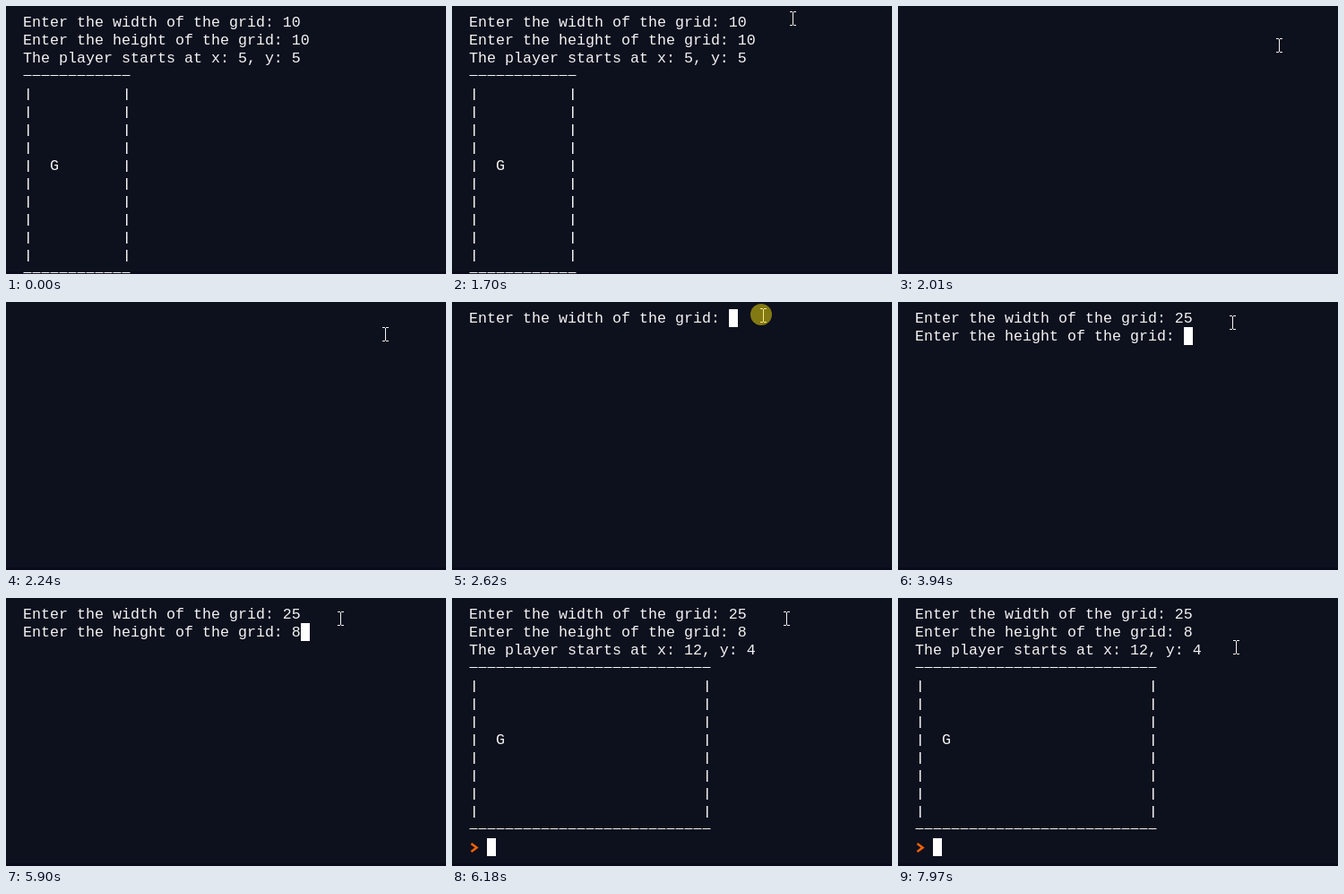
An HTML page with a canvas that plays this animation: 491 by 299 pixels, repeating every 8000 ms.

```html
<!DOCTYPE html>
<html lang="en">
<head>
<meta charset="utf-8">
<title>Grid prompt</title>
<style>
html, body { margin: 0; height: 100%; overflow: hidden; background: #0d101d; }
canvas { display: block; }
</style>
</head>
<body>
<canvas id="stage" width="491" height="299"></canvas>
<script>
const ctx = document.getElementById('stage').getContext('2d');
const LOOP = 8000, CELL = 10, LINE = 20, LEFT = 19, TOP = 8;
const INK = '#f4f4f4';
const WIDTH_PROMPT = 'Enter the width of the grid: ';
const HEIGHT_PROMPT = 'Enter the height of the grid: ';

// Pointer steps: time, left, top (no position: hidden)
const pointer = [
  [0], [70, 120, 209], [140],
  [1700, 377, 6], [1780, 388, 13], [1850, 401, 22], [1930, 413, 30],
  [2010, 422, 36], [2080, 430, 38], [2160, 433, 36], [2240, 420, 28],
  [2310, 391, 18], [2390, 361, 10], [2470, 344, 7],
  [2700, 351, 9], [2770, 363, 12], [2850, 370, 15],
  [7890, 379, 31], [7970, 374, 47]
];

const colX = col => LEFT + col * CELL;
const rowY = row => TOP + row * LINE;

function rect(x, y, w, h, color = INK) {
  ctx.fillStyle = color;
  ctx.fillRect(x, y, w, h);
}

function text(str, row, col = 0) {
  ctx.fillStyle = INK;
  ctx.fillText(str, colX(col), rowY(row) + 15);
}

function block(row, col) {
  rect(colX(col), rowY(row), CELL, LINE, '#fff');
}

function grid(width, height, goalX, goalY) {
  for (const row of [3, height + 4]) {
    for (let col = 0; col < width + 2; col++) rect(colX(col) + 0.5, rowY(row) + 9, 9, 1);
  }
  for (let row = 4; row < height + 4; row++) {
    for (const col of [0, width + 1]) rect(colX(col) + 5, rowY(row) + 4, 1.5, 13);
  }
  text('G', goalY + 4, goalX + 1);
}

function result(width, height, goalX, goalY) {
  text(WIDTH_PROMPT + width, 0);
  text(HEIGHT_PROMPT + height, 1);
  text(`The player starts at x: ${width >> 1}, y: ${height >> 1}`, 2);
  grid(width, height, goalX, goalY);
}

function input(prompt, typed, row) {
  text(prompt + typed, row);
  block(row, prompt.length + typed.length);
}

function shellPrompt(row) {
  const y = rowY(row);
  ctx.strokeStyle = '#f26207';
  ctx.lineWidth = 2.6;
  ctx.beginPath();
  ctx.moveTo(21.5, y + 6);
  ctx.lineTo(27.5, y + 10.5);
  ctx.lineTo(21.5, y + 15);
  ctx.stroke();
  block(row, 2);
}

function terminal(t) {
  if (t < 1850) result(10, 10, 2, 4);
  else if (t < 2310) return;
  else if (t < 3940) input(WIDTH_PROMPT, t < 3480 ? '' : t < 3710 ? '2' : '25', 0);
  else if (t < 6180) {
    text(WIDTH_PROMPT + '25', 0);
    input(HEIGHT_PROMPT, t < 5900 ? '' : '8', 1);
  } else {
    result(25, 8, 2, 3);
    shellPrompt(13);
  }
}

function drawPointer(t) {
  const [, x, y] = pointer.findLast(step => step[0] <= t);
  if (x === undefined) return;
  for (const edge of [y, y + 15]) {
    rect(x, edge, 3, 1);
    rect(x + 4, edge, 3, 1);
  }
  rect(x + 3, y + 1, 1, 14);
  if (t >= 2620 && t < 2770) {
    ctx.fillStyle = 'rgba(250, 225, 10, 0.5)';
    ctx.beginPath();
    ctx.arc(345, 14, 12, 0, Math.PI * 2);
    ctx.fill();
  }
}

function draw(now) {
  const t = now % LOOP;
  rect(0, 0, 491, 299, '#0d101d');
  rect(0, 296, 491, 3, '#0b0a1c');
  ctx.font = '16.667px "Liberation Mono", monospace';
  terminal(t);
  drawPointer(t);
  requestAnimationFrame(draw);
}

const start = performance.now();
draw(0);
function tick() { return performance.now() - start; }
</script>
</body>
</html>
```
